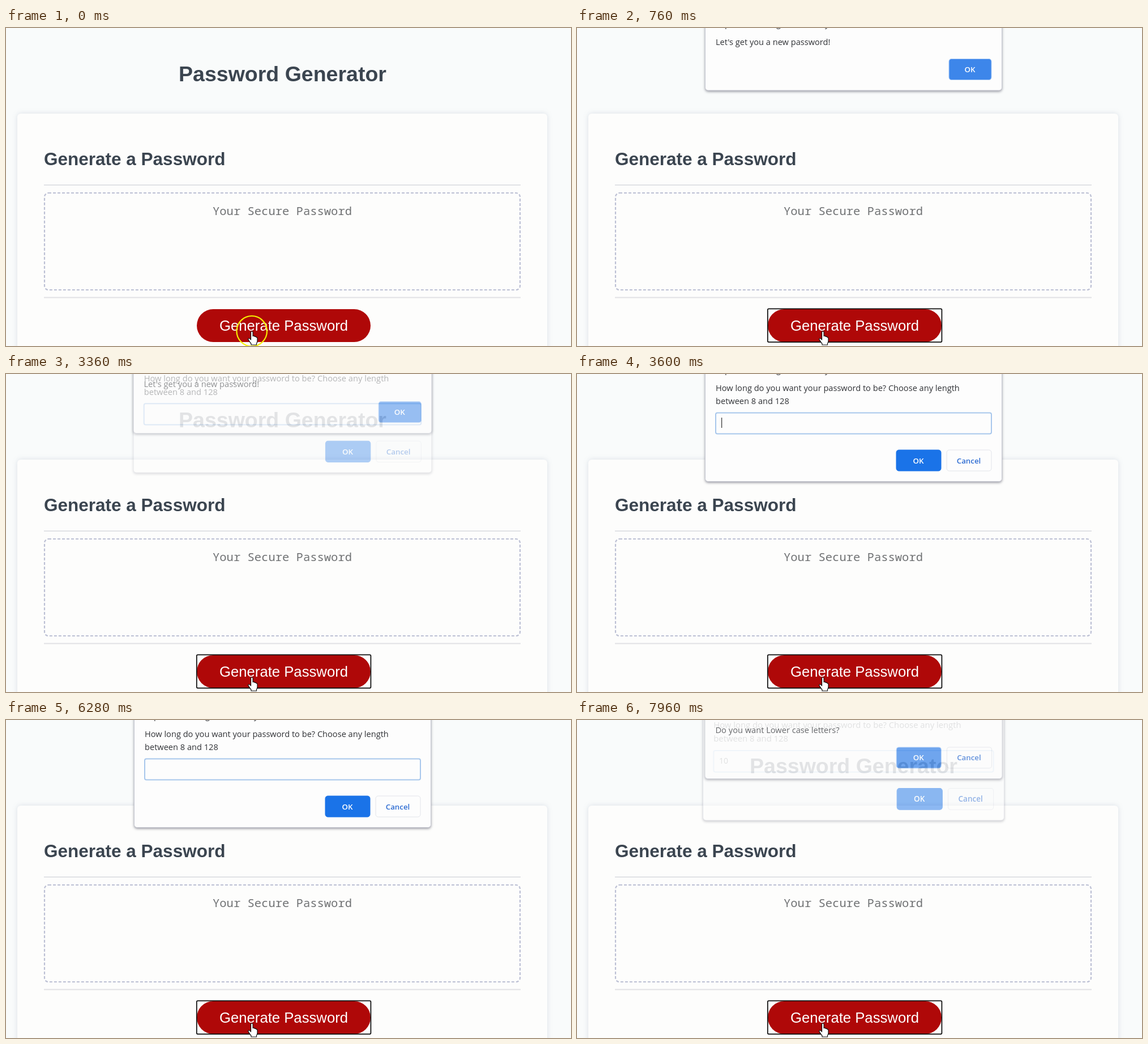
Recreate the animation shown at these times as an HTML page. Size 998 by 561 pixels, loop 8 s.

```html
<!DOCTYPE html>
<html lang="en">
<head>
<meta charset="utf-8">
<title>Password Generator</title>
<style>
  html, body { margin: 0; width: 100%; height: 100%; overflow: hidden; background: #f9fbfb; }
  svg { display: block; width: 100vw; height: 100vh; }
  .page { font-family: "Liberation Sans", Arial, sans-serif; fill: #3b4550; }
  .mono { font: 20.5px "Noto Sans Mono", monospace; fill: #707274; }
  .mid { text-anchor: middle; }
  .card { fill: #fdfdfc; filter: drop-shadow(0 0 5px rgba(70, 90, 130, .17)); }
  .dialog { font: 14.6px "Open Sans", "Noto Sans", sans-serif; fill: #303236; }
  .panel { fill: #fdfdfd; stroke: #c9cad3; filter: drop-shadow(0 2px 2px rgba(60, 62, 80, .5)); }
  .label { font-size: 13.3px; font-weight: 600; text-anchor: middle; }
</style>
</head>
<body>
<svg viewBox="0 0 998 561" preserveAspectRatio="none">
  <g class="page">
    <rect width="998" height="561" fill="#f9fbfb"/>
    <text class="mid" x="488.5" y="94" font-size="37.5" font-weight="700">Password Generator</text>
    <rect class="card" x="20" y="151" width="936" height="460" rx="6"/>
    <text x="67" y="241.5" font-size="31.5" font-weight="700">Generate a Password</text>
    <path d="M67 277H909M67 475.5H909" stroke="#e1e2e6" stroke-width="2"/>
    <rect x="68" y="291" width="840" height="171" rx="7" fill="none" stroke="#bcc0d4" stroke-width="2.2" stroke-dasharray="5 3"/>
    <text class="mono mid" x="488" y="329.5">Your Secure Password</text>
    <rect x="337" y="496" width="307" height="58" rx="29" fill="#af0808"/>
    <text class="mid" x="490.5" y="533.5" font-size="25.7" fill="#fff">Generate Password</text>
    <rect id="focus" x="336.8" y="495.3" width="307.6" height="58.8" rx="2" fill="none" stroke="#111" stroke-width="1.8"/>
  </g>
  <circle id="ring" cx="434.2" cy="534.8" fill="none" stroke-width="2.2"/>
  <path fill="#fff" stroke="#111" stroke-width="1.2" stroke-linejoin="round"
    d="M432.5 549V537q0-2 1.8-2t1.8 2v6.5q3-.8 3.2 1 2.400-.6 2.700 1.200 2-.2 2 2v4.300q0 2.500-1.500 4.500v2.500h-9.500v-2q-2.500-3-5-7.500-.6-2 1.500-2 1.500.2 3 2.500z"/>
  <g id="dialogs"></g>
</svg>
<script>
const LOOP = 8000, CENTER = 488.5;
const OPEN_MS = 240, CLOSE_MS = 150;
const byId = id => document.getElementById(id);
const clamp = x => Math.min(1, Math.max(0, x));
const show = (el, on) => el.setAttribute("visibility", on ? "inherit" : "hidden");

const text = (x, y, s, attrs = "") => `<text x="${x}" y="${y}" ${attrs}>${s}</text>`;

function button(label, x, y, width, fill, stroke, color) {
  return `<rect x="${x}" y="${y}" width="${width}" height="37" rx="4.5" fill="${fill}" stroke="${stroke}"/>` +
    text(x + width / 2 - 0.5, y + 23.5, label, `class="label" fill="${color}"`);
}
const okButton = (x, y, width, focused) => focused
  ? button("OK", x, y, width, "#3d86ea", "#a9cbf7", "#fff")
  : button("OK", x, y, width, "#1a73e8", "#1a73e8", "#fff");
const cancelButton = y => button("Cancel", 653, y, 79, "#fdfdfd", "#e2e4ea", "#2d6cd2");

// Only the descenders of the heading reach into the view.
const heading = text(261, -2, "p") + text(352, -2, "g") + text(438, -2, "y");

function addDialog(bottom, opens, closes, content) {
  byId("dialogs").insertAdjacentHTML("beforeend",
    `<g class="dialog"><rect class="panel" x="226.5" y="-60" width="524" height="${bottom + 60}" rx="5"/>${heading}${content}</g>`);
  return { el: byId("dialogs").lastElementChild, opens, closes };
}

const dialogs = [
  addDialog(110, 446, 3330,
    text(245, 29.5, "Let's get you a new password!") + okButton(657, 54.5, 75, true)),
  addDialog(189.5, 3330, 7885,
    text(245, 29.5, "How long do you want your password to be? Choose any length") +
    text(245, 53, "between 8 and 128") +
    `<rect x="245" y="68.5" width="487" height="37" rx="3" fill="#fdfdfd" stroke="#a8c7ec" stroke-width="2"/>` +
    text(254.5, 91.5, "", 'id="typed" font-size="13.8"') +
    `<rect id="caret" y="77" width="1.2" height="18" fill="#333"/>` +
    okButton(564, 134, 79) + cancelButton(134)),
  addDialog(110, 7876, Infinity,
    text(245, 29.5, "Do you want Lower case letters?") + okButton(564, 54.5, 79, true) + cancelButton(54.5))
];

function drawDialog({ el, opens, closes }, t) {
  const opened = 1 - (1 - clamp((t - opens) / OPEN_MS)) ** 3;
  const closed = clamp((t - closes) / CLOSE_MS);
  const scale = 1 + 0.008 * (1 - opened) + 0.03 * closed;
  const y = -25 * (1 - opened) - 30.5 * closed;
  show(el, opened > 0 && closed < 1);
  el.setAttribute("opacity", opened * (1 - closed));
  el.setAttribute("transform", `translate(${CENTER * (1 - scale)} ${y}) scale(${scale})`);
}

function drawInput(t) {
  const typed = t < 6580 ? "" : t < 6850 ? "1" : "10";
  const blinkStart = t < 6580 ? 3480 : t < 6850 ? 6580 : 6850;
  const half = t < 6580 ? 520 : 510;
  byId("typed").textContent = typed;
  byId("caret").setAttribute("x", 255 + typed.length * 7.9);
  show(byId("caret"), t >= blinkStart && t < 7800 && Math.floor((t - blinkStart) / half) % 2 === 0);
}

function drawClick(t) {
  const pressed = t >= 280;
  const ring = byId("ring");
  ring.setAttribute("r", 26.8 * (1 - clamp((t - 280) / 310)));
  ring.setAttribute("stroke", pressed ? "#2217b0" : "#f6f000");
  show(ring, t < 590);
  show(byId("focus"), pressed);
}

function draw(t) {
  drawClick(t);
  drawInput(t);
  dialogs.forEach(d => drawDialog(d, t));
}

const start = performance.now();
function tick() {
  draw((performance.now() - start) % LOOP);
  requestAnimationFrame(tick);
}
tick();
</script>
</body>
</html>
```
